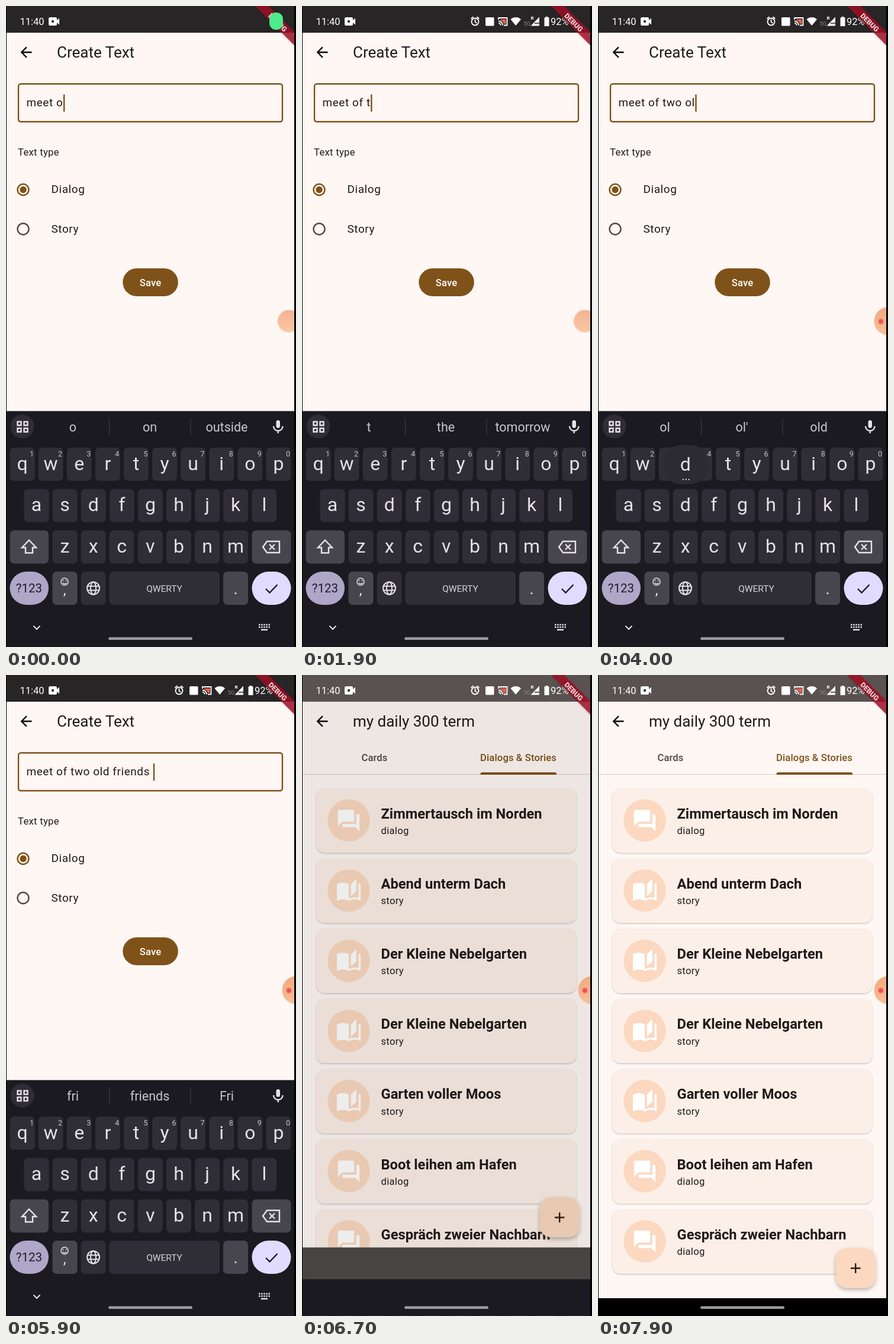
These frames come from a looping animation (490x1080 px, 8 s). An HTML page:

```html
<!DOCTYPE html>
<html lang="en">
<head>
<meta charset="utf-8">
<title>Create Text</title>
<style>
html, body { margin: 0; width: 100%; height: 100%; overflow: hidden; background: #000; }
svg { display: block; width: 490px; height: 1080px; font-family: Roboto, sans-serif; }
text { white-space: pre; }
.mid { text-anchor: middle; }
.ink { fill: #201a17; }
.line { fill: none; stroke-width: 2.4; }
.title { font-size: 26px; }
.body { font-size: 18.96px; letter-spacing: .59px; }
.small { font-size: 16.6px; letter-spacing: .3px; }
.label { font-size: 16.6px; letter-spacing: .12px; font-weight: 500; }
.head { font-size: 23.7px; font-weight: 700; }
.key { font-size: 32px; fill: #e6e1ea; }
.hint { font-size: 12.5px; fill: #c6c3cc; }
.word { font-size: 21.5px; fill: #c9c6d0; }
.basic, .plain .smart { visibility: hidden; }
.plain .basic { visibility: visible; }

#form, #scrim, #board, .drop, #cards, #bubble, #dot, #chip, #status, #bar { animation: 8s linear infinite; }
#form { animation-name: fade; }
#scrim { animation-name: lift; }
#board { animation-name: sink; }
.drop { animation-name: drop; }
#cards { animation-name: stretch; transform-origin: 0 1021px; }
#bubble { animation-name: tuck; transform-origin: 490px 531px; }
#dot { animation-name: show; }
#chip { animation-name: shrink; transform-origin: 462px 22px; }
#status { animation-name: icons; }
#bar { animation-name: brighten; }
@keyframes fade { 0%, 80% { opacity: 1 } 83.1%, 100% { opacity: 0 } }
@keyframes lift { 0%, 80% { opacity: .5 } 84.4%, 100% { opacity: 0 } }
@keyframes brighten { 0%, 80% { fill: #272525 } 83.1%, 100% { fill: #5a5250 } }
@keyframes sink {
  0%, 80.63% { transform: none; animation-timing-function: cubic-bezier(.4, 0, .2, 1) }
  86.25%, 100% { transform: translateY(400px) }
}
@keyframes drop {
  0%, 81% { transform: translateY(-367px); animation-timing-function: cubic-bezier(.4, 0, .2, 1) }
  86.6%, 100% { transform: none }
}
@keyframes stretch {
  0%, 90.7% { transform: none }
  92.5% { transform: scaleY(1.018) }
  93.75% { transform: scaleY(1.0127); animation-timing-function: ease-out }
  98.5%, 100% { transform: none }
}
@keyframes tuck {
  0%, 27.5% { transform: translateX(-12px) scale(.81); opacity: .85 }
  31%, 100% { transform: none; opacity: 1 }
}
@keyframes show { 0%, 27.5% { opacity: 0 } 31%, 100% { opacity: 1 } }
@keyframes shrink { 0%, .6% { transform: none } 5%, 100% { transform: scale(0) } }
@keyframes icons { 0%, 2.5% { opacity: 0 } 6.2%, 100% { opacity: 1 } }
</style>
</head>
<body>
<svg viewBox="0 0 490 1080">
  <defs>
    <clipPath id="screen"><path d="M1 0H487V1080H1z"/></clipPath>
    <clipPath id="view"><path d="M1 187H487V1050H1z"/></clipPath>
    <linearGradient id="peach" x2="0" y2="1">
      <stop stop-color="#f2a880"/><stop offset="1" stop-color="#f9c096"/>
    </linearGradient>
    <filter id="soft" x="-30%" y="-30%" width="160%" height="170%">
      <feDropShadow dx="0" dy="3" stdDeviation="3.5" flood-color="#000" flood-opacity=".3"/>
    </filter>
    <filter id="edge" x="-5%" y="-5%" width="110%" height="115%">
      <feDropShadow dx="0" dy="1.2" stdDeviation="1" flood-color="#000" flood-opacity=".25"/>
    </filter>
    <path id="back" d="M20 11H7.83l5.59-5.59L12 4l-8 8 8 8 1.41-1.41L7.83 13H20z" transform="translate(19.8 63.8) scale(1.185)"/>
    <path id="dialog" d="M21 6h-2v9H6v2c0 .55.45 1 1 1h11l4 4V7c0-.55-.45-1-1-1zm-4 6V3c0-.55-.45-1-1-1H3c-.55 0-1 .45-1 1v14l4-4h10c.55 0 1-.45 1-1z"/>
    <path id="story" d="M19 1l-5 5v11l5-4.5zM1 6v14.65c0 .25.25.5.5.5C3.1 20.45 5.05 20 6.5 20c1.95 0 4.05.4 5.5 1.5V6c-1.45-1.1-3.55-1.5-5.5-1.5S2.45 4.9 1 6zm22 13.5V6c-.6-.45-1.25-.75-2-1v13.5c-1.1-.35-2.3-.5-3.5-.5-1.7 0-4.15.65-5.5 1.5v2c1.35-.85 3.8-1.5 5.5-1.5 1.65 0 3.35.3 4.75 1.05.5.2.75-.2.75-.45z"/>
  </defs>
  <rect width="490" height="1080"/>
  <g clip-path="url(#screen)">
    <rect y="45" width="490" height="1006" fill="#fff7f4"/>
    <g id="list">
      <use href="#back"/>
      <text class="title ink" x="86" y="87">my daily 300 term</text>
      <text class="label mid" x="122.5" y="145" fill="#51453c">Cards</text>
      <text class="label mid" x="365.5" y="145" fill="#7f5219">Dialogs &amp; Stories</text>
      <path d="M1 167.5H488" stroke="#d6c9c2"/>
      <path d="M301.5 168v-1a3 3 0 0 1 3-3h122.5a3 3 0 0 1 3 3v1z" fill="#7f5219"/>
      <g clip-path="url(#view)"><g id="cards"></g></g>
      <g class="drop">
        <rect x="402" y="966" width="66.5" height="66.5" rx="18" fill="#fbd8bf" filter="url(#soft)"/>
        <path class="line" d="M427 999.5h16.5M435.2 991.2v16.5" stroke="#2b1704"/>
      </g>
    </g>
    <rect id="scrim" y="45" width="490" height="1006"/>
    <g id="form">
      <rect y="45" width="490" height="1006" fill="#fff7f4"/>
      <use href="#back"/>
      <text class="title ink" x="86" y="87">Create Text</text>
      <rect id="field" x="21" y="131.2" width="446" height="63.8" rx="4" fill="none"/>
      <text id="typed" class="body ink" x="34.5" y="169"></text>
      <rect id="caret" y="149" width="2.4" height="29" fill="#7f5219"/>
      <text class="small ink" x="20" y="252">Text type</text>
      <circle class="line" cx="29" cy="309.5" r="9.5" stroke="#7f5219"/>
      <circle cx="29" cy="309.5" r="5.7" fill="#7f5219"/>
      <text class="body ink" x="76.5" y="315">Dialog</text>
      <circle class="line" cx="29" cy="375.8" r="9.5" stroke="#51453c"/>
      <text class="body ink" x="76.5" y="381.5">Story</text>
      <rect id="save" x="197.3" y="442" width="93.5" height="47" rx="23.5" fill="#7f5219"/>
      <text class="label mid" x="244" y="471.8" fill="#fff">Save</text>
    </g>
    <rect class="drop" y="1050" width="490" height="420" fill="#474544"/>
    <rect y="1050" width="490" height="30"/>
    <g id="bubble">
      <circle cx="490" cy="531" r="23.5" fill="url(#peach)"/>
      <g id="dot">
        <circle cx="478" cy="531.5" r="5.5" fill="#f4957c"/>
        <circle cx="478" cy="531.5" r="3.8" fill="#e8565a"/>
      </g>
    </g>
    <g id="board">
      <rect y="682.5" width="490" height="400" fill="#1b1a21"/>
      <g class="smart">
        <circle cx="27.5" cy="708.5" r="20" fill="#2f2e36"/>
        <path d="M174.5 694v29M312 694v29" stroke="#403f47"/>
        <path class="line" d="M19.5 700.5h6v6h-6zM30.5 700.5h6v6h-6zM19.5 711.5h6v6h-6zM30.5 711.5h6v6h-6z" stroke="#e6e1ea"/>
        <rect x="456.5" y="698" width="6.5" height="13" rx="3.2" fill="#e6e1ea"/>
        <path class="line" d="M452 708a7.8 7.8 0 0 0 15.6 0M459.8 715.5v4.5" stroke="#e6e1ea"/>
        <g id="words"></g>
      </g>
      <g id="keys"></g>
      <g class="line" stroke="#e6e1ea">
        <path d="M39 900l12 12.5h-6v9H33v-9h-6z"/>
        <path d="M441 902h21v19h-21l-7-9.5zM445 907l9 9M454 907l-9 9"/>
        <g stroke-width="2">
          <circle cx="147.5" cy="981" r="10.5"/>
          <ellipse cx="147.5" cy="981" rx="4.5" ry="10.5"/>
          <path d="M138 977.5h19M138 984.5h19M46.5 1044.5l5.5 5.5 5.5-5.5"/>
        </g>
        <path d="M427 1042.5h19M427 1046.5h19" stroke-dasharray="2.5 1.6"/>
        <path d="M431 1051h11"/>
        <g class="smart" stroke-width="1.5">
          <circle cx="99" cy="970" r="6"/>
          <path d="M96 972a3.5 3.5 0 0 0 6 0M96.5 967v2M101.5 967v2"/>
        </g>
      </g>
      <text class="mid" x="39" y="988" font-size="20.5" fill="#1f1d2b">?123</text>
      <text class="mid key" x="99" y="992" style="font-size:24px">,</text>
      <text class="mid key" x="388" y="991" style="font-size:27px">.</text>
      <text class="mid smart" x="267.5" y="987" font-size="15.5" fill="#d6d2dc">QWERTY</text>
      <text class="mid basic" x="267.5" y="987" font-size="15.5" fill="#d6d2dc">English</text>
      <path class="line smart" d="M439 982l6.5 6.5L458.5 975" stroke="#1b1a21"/>
      <path class="line basic" d="M458 974.5v7h-18M445.5 975.5l-6 6 6 6" stroke="#1b1a21"/>
      <g id="pop">
        <rect x="-37" y="-32" width="74" height="66" rx="29" fill="#2c2b33"/>
        <text class="mid key" y="11"></text>
        <path d="M-5 26h12" stroke="#e6e1ea" stroke-width="2" stroke-dasharray="2 3"/>
      </g>
    </g>
    <rect x="173" y="1063.5" width="142" height="4.5" rx="2.2" fill="#9b9a9e"/>
    <g>
      <rect id="bar" width="490" height="45" fill="#272525"/>
      <text x="23.5" y="32" font-size="16.5" fill="#fff">11:40</text>
      <path d="M74.5 19h9a2.5 2.5 0 0 1 2.5 2.5v2.500l4-3.500v11l-4-3.500v2.500a2.5 2.5 0 0 1-2.500 2.500h-9a2.500 2.500 0 0 1-2.500-2.500v-9a2.500 2.500 0 0 1 2.500-2.500z" fill="#fff"/>
      <circle cx="79" cy="26" r="2.2" fill="#272525"/>
      <g id="status" fill="#fff">
        <g class="line" stroke="#fff" style="stroke-width:1.8">
          <circle cx="292.5" cy="26.5" r="6"/>
          <path d="M292.500 22.500v4.500l3 2M285.500 21.500l4-3.300M299.500 21.500l-4-3.300"/>
          <path d="M332 23v-3h14.500v12.500H341M332 25.500a7 7 0 0 1 7 7M332 28.800a3.700 3.700 0 0 1 3.700 3.700"/>
        </g>
        <path d="M335 22.500h9.500v7.500H341a9 9 0 0 0-6-6z" fill="#f0604d"/>
        <rect x="310" y="19" width="14.5" height="14.5" rx="1.5"/>
        <path d="M352.500 22.500a13 13 0 0 1 17.500 0L361.200 33z"/>
        <text x="374.5" y="33" font-size="9.5" fill="#858383">5G</text>
        <text x="386.5" y="23" font-size="8" font-weight="700">R</text>
        <path d="M401 18.500V33.500H386.500z"/>
        <path d="M393 29h8" stroke="#272525" stroke-width="1.5"/>
        <path d="M411.500 18h4v1.500h2V34h-8V19.500h2z"/>
        <text x="420" y="32" font-size="16.5">92%</text>
      </g>
      <path d="M421 0h22.500L488 44.500V67z" fill="#a01228" fill-opacity=".82" filter="url(#edge)"/>
      <text class="mid" transform="translate(459 28) rotate(45)" y="4" font-size="12" font-weight="900" fill="#ecd3d7">DEBUG</text>
      <rect id="chip" x="445" y="11" width="23" height="29" rx="11" fill="#4eea8c"/>
    </g>
  </g>
</svg>
<script>
const $ = id => document.getElementById(id);
const rect = (x, y, w, h, r, fill, extra = '') =>
  `<rect x="${x}" y="${y}" width="${w}" height="${h}" rx="${r}" fill="${fill}" ${extra}/>`;
const text = (x, y, cls, s) => `<text x="${x}" y="${y}" class="${cls}">${s}</text>`;

// List of saved texts
$('cards').innerHTML = [
  ['Zimmertausch im Norden', 'dialog'],
  ['Abend unterm Dach', 'story'],
  ['Der Kleine Nebelgarten', 'story'],
  ['Der Kleine Nebelgarten', 'story'],
  ['Garten voller Moos', 'story'],
  ['Boot leihen am Hafen', 'dialog'],
  ['Gespräch zweier Nachbarn', 'dialog']
].map(([name, kind], i) => `<g transform="translate(0 ${191 + i * 118.2})">
  ${rect(24, 0, 439.5, 108.5, 14, '#fcefe7', 'filter="url(#edge)"')}
  <circle cx="79" cy="54" r="35.7" fill="#fbd8bf"/>
  <use href="#${kind}" transform="translate(57.2 32.5) scale(1.82)" fill="#fff"/>
  ${text(133.5, 50.5, 'head ink', name)}${text(133.5, 77, 'small ink', kind)}</g>`).join('');

// Keyboard
const DIM = '#2f2e36', MID = '#47464e', STEP = 48.1;
const spots = {};
let keys = '';
[['qwertyuiop', 27.5, 744], ['asdfghjkl', 51.5, 813.7], ['zxcvbnm', 99.5, 883.4]].forEach(([row, x0, y]) =>
  [...row].forEach((c, i) => {
    const x = x0 + i * STEP;
    spots[c] = [x, y - 42];
    keys += rect(x - 21, y, 42, 56, 7, DIM) + text(x, y + 37.5, 'mid key', c);
    if (row.length === 10) keys += text(x + 16, y + 15, 'mid hint smart', (i + 1) % 10);
  }));
keys += rect(6.5, 883.4, 65.5, 56, 7, MID) + rect(415.5, 883.4, 66, 56, 7, MID)
  + rect(6.5, 953, 65.5, 56, 28, '#aea7c8') + rect(78.5, 953, 42, 56, 7, MID)
  + rect(126.5, 953, 42, 56, 7, DIM) + rect(174.5, 953, 186.5, 56, 7, DIM, 'id="space"')
  + rect(367, 953, 42, 56, 7, MID) + rect(415.5, 953, 66, 56, 28, '#e1dcff');
$('keys').innerHTML = keys;
$('words').innerHTML = [113, 243, 373].map(x => text(x, 716.5, 'mid word', '')).join('');

// Time in ms, what is typed, suggestions shown from then on
const steps = [
  [0, 'o', 'o|on|outside'],
  [350, 'f', 'of|off|offer'],
  [950, ' ', 'a|the|my'],
  [1650, 't', 't|the|tomorrow'],
  [2150, 'w', 'tw|two|twice'],
  [2550, 'o', 'two|Two|twos'],
  [2950, ' ', 'days|weeks|hours'],
  [3150, 'o', 'o|of|other'],
  [3525, 'l', "ol|ol'|old"],
  [4050, 'd', 'old|older|Old'],
  [4650, ' ', 'and|friends|people'],
  [4850, 'f', 'f|friends|for'],
  [5050, 'r', 'fr|friends|from'],
  [5350, 'i', 'fri|friends|Fri'],
  [5850, 'ends ', 'fri|friends|Fri'],
  [5950, '', 'in|and|who']
];
const words = [...$('words').children];
const clock = $('form').getAnimations()[0];
const popText = $('pop').querySelector('text');
const put = (el, s) => { if (el.textContent !== s) el.textContent = s; };

function draw() {
  const t = (clock.currentTime || 0) % 8000;
  const done = steps.filter(s => s[0] <= t);
  put($('typed'), 'meet ' + done.map(s => s[1]).join(''));
  done.at(-1)[2].split('|').forEach((w, i) => put(words[i], w));

  const focus = t < 6400;
  const last = done.filter(s => s[1]).at(-1)[0];
  $('caret').setAttribute('x', 35 + $('typed').getComputedTextLength());
  $('caret').style.opacity = +(focus && (t - last) % 1000 < 500);
  $('field').setAttribute('stroke', focus ? '#7f5219' : '#81756c');
  $('field').setAttribute('stroke-width', focus ? 2.4 : 1.2);
  $('save').setAttribute('fill', t > 6150 && t < 6450 ? '#8b612c' : '#7f5219');
  $('board').classList.toggle('plain', t >= 6450);

  // A key is held from shortly before its letter appears
  const held = steps.find(s => s[0] && t > s[0] - 130 && t < s[0] + 70)?.[1];
  const spot = spots[held];
  $('space').setAttribute('fill', held === ' ' ? '#4a4952' : DIM);
  $('pop').style.display = spot ? '' : 'none';
  if (spot) {
    $('pop').setAttribute('transform', `translate(${spot})`);
    put(popText, held);
  }
  requestAnimationFrame(draw);
}
draw();
</script>
</body>
</html>
```
